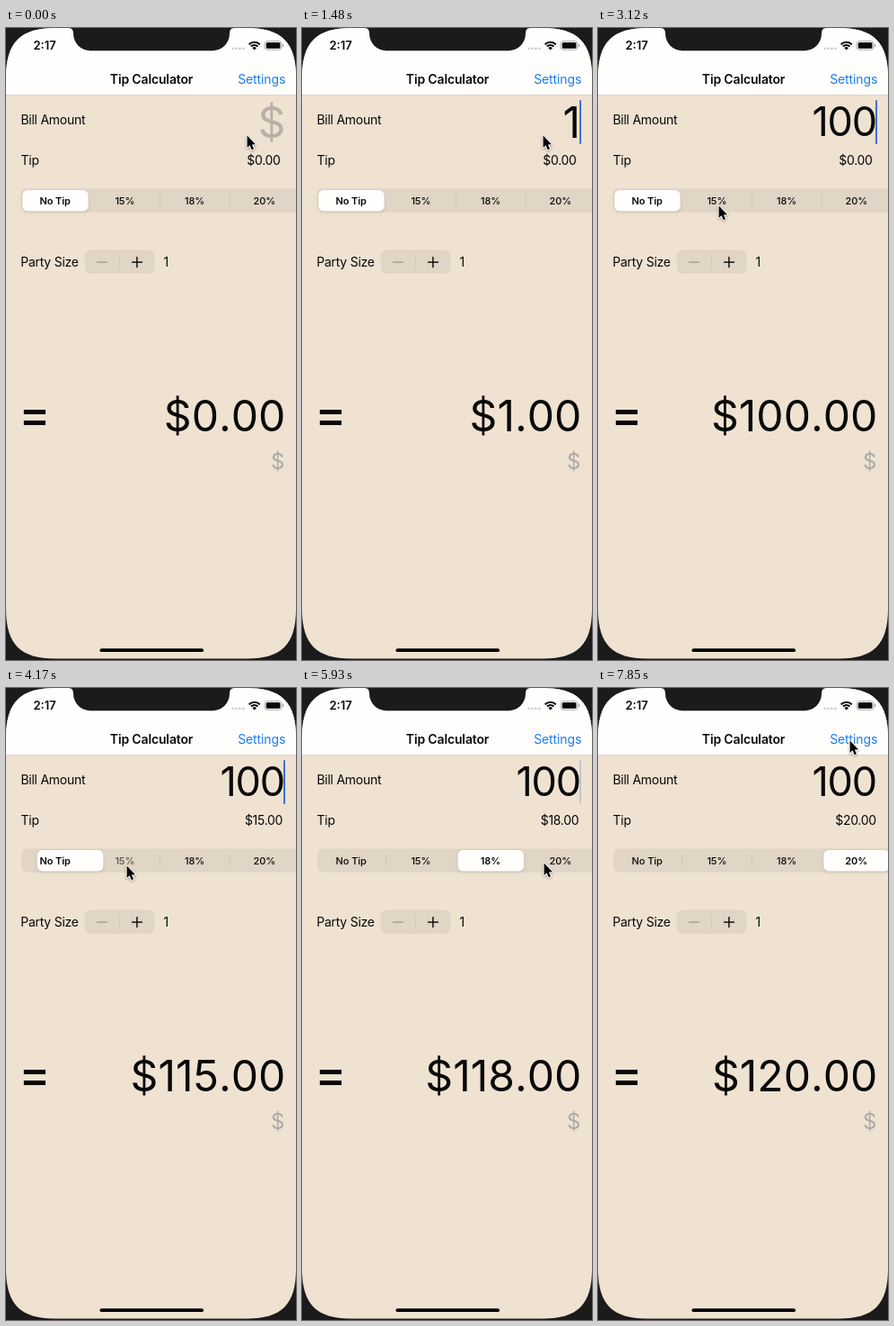
Animation of 323 by 702 pixels, one loop 7.99 s. Source, as an HTML page with a canvas:

```html
<!DOCTYPE html>
<html lang="en">
<head>
<meta charset="utf-8">
<title>Tip Calculator</title>
<style>
  html, body { margin: 0; width: 100%; height: 100%; overflow: hidden; background: #1b1b1b; }
  canvas { display: block; width: 323px; height: 702px; }
</style>
</head>
<body>
<canvas id="stage"></canvas>
<script>
const W = 323, H = 702, LOOP = 7990;
const STEP = 148.2; // the picture advances in steps of this many ms
const INK = '#080808', SAND = '#efe2d1', CONTROL = '#e1d5c6', LINE = '#d1c6b8', BEZEL = '#1b1b1b';
const PAPER = '#fffefc', SEGMENT = 77.7;

const typing = { text: '100', start: 1470, gap: 300 };
const rates = [0, 15, 18, 20];
const taps = [4140, 5030, 6150]; // each tap picks the next rate
const start = { x: 268, y: 119 };
const moves = [
  { from: 2560, to: 3060, x: 134, y: 197 },
  { from: 4350, to: 5030, x: 188, y: 190 },
  { from: 5350, to: 5900, x: 269, y: 194 },
  { from: 6850, to: 7750, x: 280, y: 58 }
];

const canvas = document.getElementById('stage');
const ctx = canvas.getContext('2d');
const ratio = window.devicePixelRatio || 1;
canvas.width = W * ratio;
canvas.height = H * ratio;

const clamp = (v, lo = 0, hi = 1) => Math.min(hi, Math.max(lo, v));
const ramp = (t, from, to) => clamp((t - from) / (to - from));
const ease = p => p * p * (3 - 2 * p);

function typedCount(t) {
  return clamp(Math.floor((t - typing.start) / typing.gap) + 1, 0, typing.text.length);
}

// The blink restarts at every keystroke.
function caretAlpha(t, count) {
  const anchor = count ? typing.start + (count - 1) * typing.gap : 240;
  const phase = (t - anchor + 1000) % 1000;
  return phase < 700 ? 1 - ramp(phase, 470, 580) : ramp(phase, 820, 970);
}

// Thumb place in segments, from 0 to 3
function thumbPlace(t) {
  return taps.reduce((sum, tap) => sum + ease(ramp(t, tap - 80, tap + 220)), 0);
}

function mousePlace(t) {
  return moves.reduce((at, move) => {
    const p = ease(ramp(t, move.from, move.to));
    return { x: at.x + (move.x - at.x) * p, y: at.y + (move.y - at.y) * p };
  }, start);
}

function text(str, x, y, size, { weight = 400, color = INK, align = 'left', spacing = 0 } = {}) {
  ctx.font = `${weight} ${size}px Inter, sans-serif`;
  ctx.letterSpacing = spacing + 'px';
  ctx.textAlign = align;
  ctx.fillStyle = color;
  ctx.fillText(str, x, y);
}

function box(x, y, w, h, r, color) {
  ctx.fillStyle = color;
  ctx.beginPath();
  ctx.roundRect(x, y, w, h, r);
  ctx.fill();
}

function rect(x, y, w, h, color) {
  ctx.fillStyle = color;
  ctx.fillRect(x, y, w, h);
}

// Screen outline with smooth, continuous corners
function clipScreen() {
  const w = W, h = 700.5, far = 55, near = 16;
  ctx.beginPath();
  ctx.moveTo(0, far);
  ctx.bezierCurveTo(0, near, near, 0, far, 0);
  ctx.lineTo(w - far, 0);
  ctx.bezierCurveTo(w - near, 0, w, near, w, far);
  ctx.lineTo(w, h - far);
  ctx.bezierCurveTo(w, h - near, w - near, h, w - far, h);
  ctx.lineTo(far, h);
  ctx.bezierCurveTo(near, h, 0, h - near, 0, h - far);
  ctx.clip();
}

function drawNotch() {
  ctx.fillStyle = BEZEL;
  ctx.beginPath();
  ctx.moveTo(70, 0);
  ctx.quadraticCurveTo(75, 0, 75, 6);
  ctx.arcTo(75, 25.2, 95, 25.2, 19);
  ctx.arcTo(249, 25.2, 249, 6, 19);
  ctx.lineTo(249, 6);
  ctx.quadraticCurveTo(249, 0, 254, 0);
  ctx.fill();
}

function drawStatus() {
  text('2:17', 30.5, 24.2, 13, { weight: 600 });
  for (let i = 0; i < 4; i++) box(251.3 + i * 3.9, 21.6, 2.6, 2.6, 1.3, '#cbcbca');

  // Wi-Fi fan
  const x = 276.7, y = 24.4;
  const arc = r => {
    ctx.beginPath();
    ctx.arc(x, y, r, -Math.PI * 0.75, -Math.PI * 0.25);
  };
  ctx.strokeStyle = ctx.fillStyle = INK;
  ctx.lineWidth = 2;
  for (const r of [5.4, 8.6]) {
    arc(r);
    ctx.stroke();
  }
  arc(3.2);
  ctx.lineTo(x, y);
  ctx.fill();

  // Battery
  ctx.strokeStyle = '#a5a5a4';
  ctx.lineWidth = 0.9;
  ctx.beginPath();
  ctx.roundRect(288.2, 14.6, 18.8, 9.6, 2.8);
  ctx.stroke();
  box(289.7, 16.1, 15.8, 6.6, 1.5, INK);
  box(308, 17.8, 1.2, 3.2, 0.6, '#a5a5a4');
}

function drawSegments(t) {
  const place = thumbPlace(t), chosen = Math.round(place);
  box(17, 178.5, W, 26.5, 7, CONTROL);
  for (let i = 1; i < rates.length; i++) {
    const hidden = place > i - 1.5 && place < i + 0.5;
    if (!hidden) rect(15.5 + i * SEGMENT, 184, 1, 15.5, LINE);
  }
  ctx.save();
  ctx.shadowColor = 'rgba(0,0,0,.12)';
  ctx.shadowBlur = 4 * ratio;
  ctx.shadowOffsetY = ratio;
  box(18.2 + place * SEGMENT, 180, 73.5, 23.5, 6, PAPER);
  ctx.restore();
  rates.forEach((rate, i) => {
    const sinceTap = t - taps[i - 1];
    const pressed = sinceTap > -150 && sinceTap < 100;
    text(rate ? rate + '%' : 'No Tip', 54.6 + i * SEGMENT, 195.7, 11, {
      weight: i === chosen ? 600 : 500,
      color: pressed ? '#5c564f' : INK,
      align: 'center',
      spacing: -0.1
    });
  });
}

function drawStepper() {
  text('Party Size', 16.2, 265.4, 14, { spacing: -0.25 });
  box(87.5, 246.5, 78, 26.5, 7, CONTROL);
  rect(126, 252, 1, 15.5, LINE);
  rect(101, 259.5, 12, 1.3, '#a1998f');
  rect(140, 259.4, 12, 1.4, INK);
  rect(145.2, 254.1, 1.4, 12, INK);
  text('1', 175.4, 265.4, 14);
}

function drawBill(bill, caret) {
  if (bill) {
    // Long amounts shrink to fit the field.
    const shrink = bill.length > 2 ? 1 : 0;
    text(bill, 310, 122 - 2 * shrink, 48 - 3 * shrink, { align: 'right', spacing: -1.2 * shrink });
  } else {
    text('$', 311.3, 121.7, 48, { align: 'right', color: '#b9b1a7' });
  }
  ctx.globalAlpha = caret;
  box(309, 80, 2, bill ? 49 : 44, 1, '#426fd2');
  ctx.globalAlpha = 1;
}

function drawTotal(total) {
  ctx.font = '500 53px Inter, sans-serif';
  ctx.letterSpacing = '0px';
  const ink = ctx.measureText('=');
  const shift = (ink.actualBoundingBoxAscent - ink.actualBoundingBoxDescent) / 2;
  text('=', 32, 433.3 + shift, 53, { weight: 500, align: 'center' });
  ctx.fontKerning = 'none';
  text('$' + total.toFixed(2), 311.3, 448, 48, { align: 'right' });
  ctx.fontKerning = 'auto';
  text('$', 310.5, 490.3, 24, { align: 'right', color: '#a9aaa7' });
}

function drawMouse({ x, y }) {
  ctx.save();
  ctx.translate(x, y);
  ctx.beginPath();
  [[0.6, 0.6], [0.6, 14], [3.6, 11.2], [5.7, 16.2], [8, 15.2], [5.9, 10.4], [10, 10.2]]
    .forEach(([px, py]) => ctx.lineTo(px, py));
  ctx.closePath();
  ctx.lineJoin = 'round';
  ctx.strokeStyle = '#fff';
  ctx.lineWidth = 2;
  ctx.shadowColor = 'rgba(0,0,0,.35)';
  ctx.shadowBlur = 2.5 * ratio;
  ctx.shadowOffsetY = ratio;
  ctx.stroke();
  ctx.shadowColor = 'transparent';
  ctx.fillStyle = '#000';
  ctx.fill();
  ctx.restore();
}

function draw(t) {
  const count = typedCount(t);
  const bill = typing.text.slice(0, count);
  const rate = rates[taps.filter(tap => t >= tap).length];
  const tip = Number(bill) * rate / 100;

  ctx.setTransform(ratio, 0, 0, ratio, 0, 0);
  rect(0, 0, W, H, BEZEL);
  ctx.save();
  clipScreen();
  rect(0, 0, W, H, SAND);
  rect(0, 0, W, 74, PAPER);
  rect(0, 74, W, 0.6, '#d3cbc1');

  drawStatus();
  text('Tip Calculator', 162, 61.5, 14, { weight: 600, align: 'center', spacing: -0.15 });
  text('Settings', 311.3, 61.5, 14, { align: 'right', color: '#187cf5', spacing: -0.1 });
  text('Bill Amount', 16.4, 107, 14, { spacing: -0.25 });
  text('Tip', 16.5, 151.9, 14, { spacing: -0.25 });
  text('$' + tip.toFixed(2), 287, 151.7, 14, { align: 'center', spacing: -0.3 });
  drawBill(bill, caretAlpha(t, count));
  drawSegments(t);
  drawStepper();
  drawTotal(Number(bill) + tip);
  box(104.5, 689.3, 115.5, 3.8, 1.9, '#000');
  drawNotch();
  drawMouse(mousePlace(t));
  ctx.restore();
}

function tick() {
  const t = performance.now() % LOOP;
  draw(Math.floor(t / STEP + 0.1) * STEP);
  requestAnimationFrame(tick);
}
tick();
</script>
</body>
</html>
```
